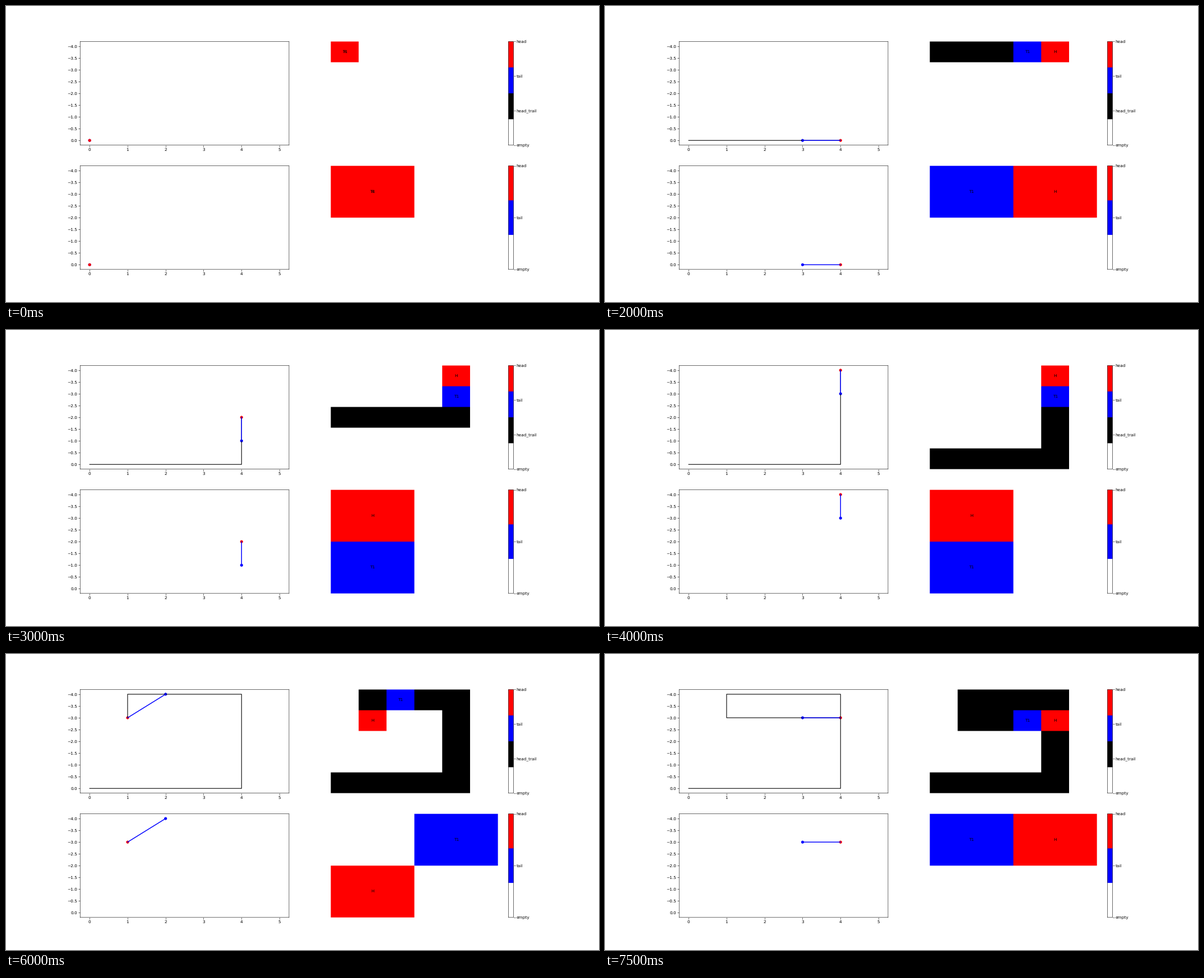
A matplotlib script that plays this animation: 1058x529 px, repeating every 8000 ms.

```python
import numpy as np
import matplotlib.pyplot as plt
from matplotlib.animation import FuncAnimation
from matplotlib.cm import ScalarMappable
from matplotlib.colors import ListedColormap, Normalize

# Keep shapes and glyphs at their true subpixel size and place.
plt.rcParams["path.snap"] = False
plt.rcParams["text.hinting"] = "none"

DPI = 52.9
STEP = {"R": (1, 0), "L": (-1, 0), "U": (0, -1), "D": (0, 1)}
MOVES = "RRRRUUUULLLDRRR"


def follow(tail, head):
    """Move the tail one step if it no longer touches the head."""
    gap = head - tail
    return tail + np.sign(gap) if np.abs(gap).max() > 1 else tail


def simulate():
    heads = [np.array([0, 0])]
    tails = [np.array([0, 0])]
    for move in MOVES:
        heads.append(heads[-1] + STEP[move])
        tails.append(follow(tails[-1], heads[-1]))
    return np.array(heads), np.array(tails)


def coverage(low, high, count):
    """Share of each pixel that lies in each of count equal cells."""
    edges = np.linspace(low, high, count + 1) - np.floor(low)
    pixel = np.arange(np.ceil(edges[-1]))[:, None]
    span = np.minimum(pixel + 1, edges[1:]) - np.maximum(pixel, edges[:-1])
    return np.clip(span, 0, None)


class Mosaic:
    """Coloured cells filling an axes box, with smooth edges."""

    def __init__(self, ax, shape, cmap):
        x0, y0, x1, y1 = ax.bbox.extents
        self.rows = coverage(y0, y1, shape[0])
        self.cols = coverage(x0, x1, shape[1])
        self.cmap = cmap
        blank = np.ones((len(self.rows), len(self.cols), 3))
        self.image = ax.figure.figimage(blank, int(x0), int(y0),
                                        origin="lower", zorder=-1)

    def paint(self, cells):
        ink = 1 - self.cmap(cells[::-1])[..., :3]
        mixed = np.einsum("ir,rck,jc->ijk", self.rows, ink, self.cols)
        self.image.set_data(np.clip(1 - mixed, 0, 1))


class PathView:
    def __init__(self, ax, show_trail):
        ax.set_xlim(-0.25, 5.25)
        ax.set_ylim(0.2, -4.2)
        ax.set_xticks(range(6))
        ax.set_yticks(np.arange(-4, 0.1, 0.5))
        self.show_trail = show_trail
        self.knots = ax.scatter([0, 0], [0, 0], c=["blue", "red"], zorder=1)
        self.trail, = ax.plot([], [], color="black", lw=1.5)
        self.rope, = ax.plot([], [], color="blue", lw=2)

    def update(self, trail, tail):
        rope = np.array([tail, trail[-1]])
        self.knots.set_offsets(rope)
        self.rope.set_data(*rope.T)
        if self.show_trail:
            self.trail.set_data(*trail.T)


class GridView:
    def __init__(self, ax, shape, colors, names, show_trail):
        count = len(names)
        self.shape, self.top, self.show_trail = shape, count - 1, show_trail
        cmap = ListedColormap(colors)
        ax.set_xlim(-0.5, shape[1] - 0.5)
        ax.set_ylim(shape[0] - 0.5, -0.5)
        ax.axis("off")
        bar = ax.figure.colorbar(
            ScalarMappable(Normalize(0, self.top), cmap), ax=ax,
            ticks=range(count))
        bar.ax.set_yticklabels(names)
        bar.solids.set_visible(False)
        bar.ax.patch.set_visible(False)
        ax.figure.draw_without_rendering()  # settles the bar's box
        Mosaic(bar.ax, (count, 1), cmap).paint(np.arange(count)[::-1, None])
        self.mosaic = Mosaic(ax, shape, cmap)
        self.labels = [ax.text(0, 0, s, ha="center", va="center")
                       for s in ("T1", "H")]

    def update(self, trail, tail):
        rope = np.array([tail, trail[-1]])
        points = np.vstack([trail, rope]) if self.show_trail else rope
        origin = points.min(axis=0)
        cells = np.zeros(self.shape, int)
        if self.show_trail:
            cols, rows = (trail - origin).T
            cells[rows, cols] = 1
        for level, spot, label in zip((self.top - 1, self.top),
                                      rope - origin, self.labels):
            cells[spot[1], spot[0]] = level
            label.set_position(spot)
        self.mosaic.paint(cells)


heads, tails = simulate()
fig, axes = plt.subplots(2, 2, figsize=(20, 10), dpi=DPI)
views = [
    PathView(axes[0, 0], True),
    GridView(axes[0, 1], (5, 6), ["white", "black", "blue", "red"],
             ["empty", "head_trail", "tail", "head"], True),
    PathView(axes[1, 0], False),
    GridView(axes[1, 1], (2, 2), ["white", "blue", "red"],
             ["empty", "tail", "head"], False),
]


def draw(i):
    for view in views:
        view.update(heads[:i + 1], tails[i])
    return []


anim = FuncAnimation(fig, draw, frames=len(heads), interval=500,
                     init_func=lambda: draw(0), repeat=True, repeat_delay=0)
plt.show()
```
